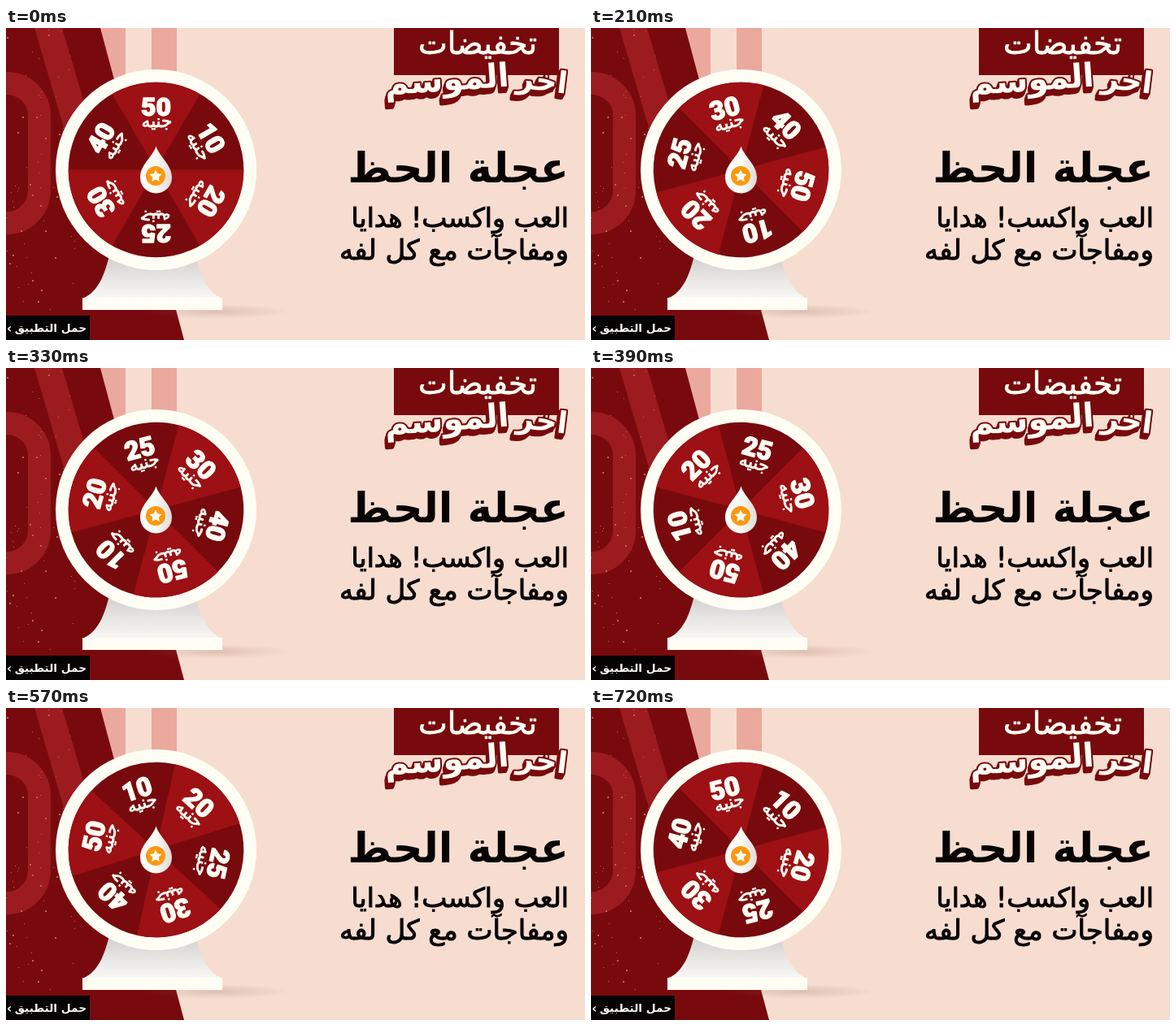
An HTML page with a canvas for the animation above (750 ms loop, 712x384 px).

```html
<!DOCTYPE html>
<html lang="ar">
<head>
<meta charset="utf-8">
<title>عجلة الحظ</title>
<style>
  html, body { margin: 0; width: 100%; height: 100%; overflow: hidden; background: #f6ddd0; }
  canvas { display: block; }
</style>
</head>
<body>
<canvas id="stage" width="712" height="384"></canvas>
<script>
const ctx = document.getElementById('stage').getContext('2d');
const LOOP = 750, STEP = 30;
const BEIGE = '#f6ddd0', DARK = '#780a0d', RED = '#9d1013', WHITE = '#fffef5', INK = '#080404';
const ARABIC = '"DejaVu Sans", sans-serif';
const HUB = { x: 184.5, y: 174.5 }, FACE = 107.8;
const PRIZES = ['50', '10', '20', '25', '30', '40'];
const rad = deg => deg * Math.PI / 180;

function polygon(color, ...points) {
  ctx.fillStyle = color;
  ctx.beginPath();
  points.forEach(([x, y]) => ctx.lineTo(x, y));
  ctx.closePath();
  ctx.fill();
}

function disc(color, x, y, r) {
  ctx.fillStyle = color;
  ctx.beginPath();
  ctx.arc(x, y, r, 0, Math.PI * 2);
  ctx.fill();
}

function gradient(x0, y0, x1, y1, ...colors) {
  const g = ctx.createLinearGradient(x0, y0, x1, y1);
  colors.forEach((c, i) => g.addColorStop(i / (colors.length - 1), c));
  return g;
}

// Fills text and thickens its strokes by `bold` pixels.
function write(text, x, y, font, color, { bold = 0, align = 'right', dir = 'rtl' } = {}) {
  ctx.font = font;
  ctx.direction = dir;
  ctx.textAlign = align;
  ctx.fillStyle = ctx.strokeStyle = color;
  ctx.fillText(text, x, y);
  if (!bold) return;
  ctx.lineJoin = 'round';
  ctx.lineWidth = bold;
  ctx.strokeText(text, x, y);
}

function drawBackdrop() {
  ctx.fillStyle = BEIGE;
  ctx.fillRect(0, 0, 712, 384);
  ctx.fillStyle = '#eba99d';
  ctx.fillRect(116, 0, 31, 120);
  ctx.fillRect(179, 0, 31, 120);
  polygon(DARK, [0, 0], [116, 0], [219, 384], [0, 384]);
  polygon('#9c1b1f', [35, 0], [69, 0], [119, 170], [85, 170]);

  ctx.strokeStyle = '#9c1b1f';
  ctx.lineWidth = 28;
  ctx.beginPath();
  ctx.roundRect(-50, 68, 91, 172, 40);
  ctx.stroke();

  let seed = 11;
  const random = () => (seed = seed * 16807 % 2147483647) / 2147483647;
  ctx.fillStyle = '#c0605c';
  for (let i = 0; i < 70; i++) {
    const size = random() < 0.3 ? 2 : 1;
    ctx.fillRect(random() * 85 | 0, random() * 350 | 0, size, size);
  }
}

function drawStand() {
  ctx.save();
  ctx.translate(258, 349);
  ctx.scale(1, 0.1);
  const shade = ctx.createRadialGradient(0, 0, 0, 0, 0, 90);
  shade.addColorStop(0, 'rgba(150,105,90,.25)');
  shade.addColorStop(1, 'rgba(150,105,90,0)');
  disc(shade, 0, 0, 90);
  ctx.restore();

  ctx.fillStyle = gradient(0, 278, 0, 332, '#cfcdcb', '#e4e3e1', '#f8f7f4');
  ctx.beginPath();
  ctx.moveTo(128, 275);
  ctx.bezierCurveTo(122, 305, 112, 325, 96, 332);
  ctx.lineTo(264, 332);
  ctx.bezierCurveTo(248, 325, 238, 305, 232, 275);
  ctx.fill();
  ctx.fillStyle = WHITE;
  ctx.fillRect(94, 332, 172, 15);
}

function drawWord(text, x, y, size, angle) {
  ctx.save();
  ctx.translate(x, y);
  ctx.rotate(rad(angle));
  const style = { bold: 4, align: 'center' };
  const font = `700 ${size}px ${ARABIC}`;
  for (let d = 0; d <= 6; d++) write(text, -d * 0.4, d, font, DARK, style);
  write(text, 0, 0, font, WHITE, { align: 'center' });
  ctx.restore();
}

function drawCopy() {
  ctx.fillStyle = DARK;
  ctx.fillRect(477, 0, 203, 58);
  write('تخفيضات', 653, 32, `38px ${ARABIC}`, WHITE, { bold: 0.8 });
  drawWord('الموسم', 543, 77, 40.5, -4);
  drawWord('اخر', 658, 77, 37, 7);

  write('عجلة الحظ', 692, 190, `700 51.5px ${ARABIC}`, INK);
  write('العب واكسب! هدايا', 692, 245, `33px ${ARABIC}`, INK, { bold: 1 });
  write('ومفاجآت مع كل لفه', 692, 285, `34px ${ARABIC}`, INK, { bold: 1 });

  ctx.fillStyle = '#050303';
  ctx.fillRect(0, 354, 103, 30);
  write('حمل التطبيق', 99, 374, `700 13.7px ${ARABIC}`, WHITE);
  write('‹', 1, 375, `700 15px ${ARABIC}`, WHITE, { align: 'left', dir: 'ltr' });
}

function drawWheel(angle) {
  disc(WHITE, HUB.x, HUB.y, 123.5);
  ctx.save();
  ctx.translate(HUB.x, HUB.y);
  ctx.rotate(rad(angle));
  disc(DARK, 0, 0, FACE);
  PRIZES.forEach((prize, i) => {
    ctx.save();
    ctx.rotate(rad(i * 60));
    if (i % 2 === 0) {
      ctx.fillStyle = RED;
      ctx.beginPath();
      ctx.moveTo(0, 0);
      ctx.arc(0, 0, FACE, rad(-120), rad(-60));
      ctx.fill();
    }
    write(prize, 0, -67, '900 32px Roboto, "Liberation Sans", sans-serif', WHITE,
      { bold: 1.4, align: 'center', dir: 'ltr' });
    write('جنيه', 1, -53, `21.5px ${ARABIC}`, WHITE, { bold: 0.9, align: 'center' });
    ctx.restore();
  });
  ctx.restore();
}

function drawPointer() {
  ctx.fillStyle = gradient(165, 0, 204, 0, '#fffefa', '#fbf9f4', '#dfdad5');
  ctx.beginPath();
  ctx.moveTo(184.5, 145.5);
  ctx.bezierCurveTo(188, 158, 204, 168, 204, 184);
  ctx.arc(184.5, 184, 19.5, 0, Math.PI);
  ctx.bezierCurveTo(165, 168, 181, 158, 184.5, 145.5);
  ctx.fill();
  disc('#fd970f', 184, 182, 12);
  const star = Array.from({ length: 10 }, (_, i) => {
    const r = i % 2 ? 4 : 8, a = rad(i * 36 - 90);
    return [184 + r * Math.cos(a), 182.5 + r * Math.sin(a)];
  });
  polygon(WHITE, ...star);
}

// Steady spin for three quarters of a turn, then slightly slower.
const spin = step => 15 * Math.min(step, 18) + 12.5 * Math.max(step - 18, 0);

function draw(now) {
  const step = Math.floor((now % LOOP) / STEP);
  drawBackdrop();
  drawStand();
  drawWheel(spin(step));
  drawPointer();
  drawCopy();
  requestAnimationFrame(draw);
}

draw(0);
</script>
</body>
</html>
```
